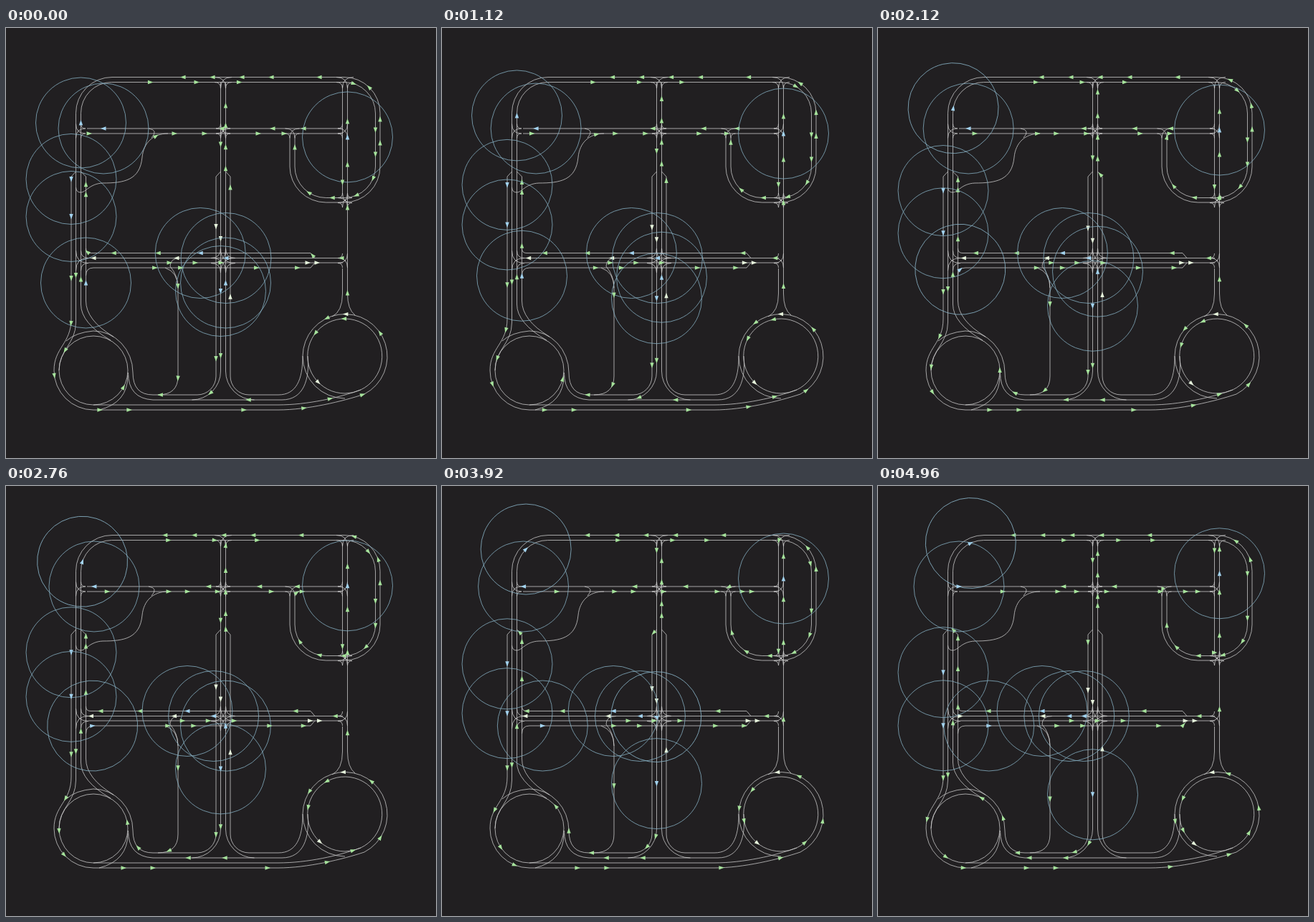
Animation, 600 px wide and 599 px high, one loop 5000 ms. Source, as an HTML page:

```html
<!DOCTYPE html>
<html>
<head>
<meta charset="utf-8">
<style>
  html, body { margin: 0; width: 100%; height: 100%; overflow: hidden; background: #211f21; }
  svg { display: block; width: 100%; height: 100%; }
  .lanes { fill: none; stroke: #d2d2d2; stroke-width: .75; }
  .ring { fill: none; stroke: #86afc2; stroke-width: .8; }
</style>
</head>
<body>
<svg viewBox="0 0 600 599"><path class="lanes"/></svg>
<script>
const NS = 'http://www.w3.org/2000/svg';
const svg = document.querySelector('svg');
const lanes = [], cars = [];
// Pixels travelled during one loop
const FAST = 76, FREE = 58, BUSY = 42, SLOW = 20, HELD = 8;

function add(tag, attrs) {
  const el = document.createElementNS(NS, tag);
  for (const name in attrs) el.setAttribute(name, attrs[name]);
  return svg.appendChild(el);
}

class Trip {
  constructor(d) {
    this.path = document.createElementNS(NS, 'path');
    this.path.setAttribute('d', d);
  }
  place(start, travel, fill, ring) {
    const body = add('path', { d: 'M4 0L-3.5 2.7V-2.7Z', fill });
    cars.push({ path: this.path, start, travel, parts: ring ? [body, ring] : [body] });
    return this;
  }
  send(speed, first, count = 1, gap = 0) {
    const fill = speed === HELD ? '#e6f3dc' : '#a6e39c';
    for (let i = 0; i < count; i++) this.place(first + i * gap, speed, fill);
    return this;
  }
  scan(start, travel) {
    return this.place(start, travel, '#a3d3ef', add('circle', { r: 63, class: 'ring' }));
  }
}

const trip = d => new Trip(d);
function road(d) {
  lanes.push(d);
  return trip(d);
}

// Turning curves of a junction, for the arms given by sign
function junction(x, y, reach, across = [-1, 1], along = [-1, 1]) {
  const lane = 3.5;
  for (const sx of [-1, 1]) for (const sy of along) {
    const from = `M${x + sx * lane} ${y + sy * reach}Q${x + sx * lane} `;
    if (across.includes(sx)) road(from + `${y + sy * lane} ${x + sx * reach} ${y + sy * lane}`);
    if (across.includes(-sx)) road(from + `${y - sy * lane} ${x - sx * reach} ${y - sy * lane}`);
  }
}

// Top road and the loop on the right
road('M522 193V118.5A50 50 0 0 0 472 68.5H148A50.5 50 0 0 0 97.5 118.5')
  .send(FREE, 33, 2, 33).send(FREE, 188).send(FREE, 255, 4, 41);
road('M104.5 200V118.5A43 43 0 0 1 147.5 75.5H472A43.5 43.5 0 0 1 515.5 119V193A43.5 43.5 0 0 1 472 236.5H446.5A43.5 43.5 0 0 1 403 193V153.5')
  .send(FREE, 203, 2, 124).send(FREE, 487).send(BUSY, 565, 6, 34).scan(68, 62);
road('M522 193A50 50 0 0 1 472 243H446.5A50.5 50 0 0 1 396 193V153.5');
trip('M507 83A50 50 0 0 0 480 69Q469.5 69 469.5 80V140').send(FREE, 0);
trip('M403 193V155Q403 147 411 147H470').send(BUSY, 27);

// Centre road
road('M299.5 200L293 207V485A26 26 0 0 1 267 511H205Q177 511 177 480A55 58 0 0 0 122 422Q97 424 84 436')
  .send(HELD, 79).send(FREE, 263).send(FAST, 380);
road('M299.5 75.5V478A40 40 0 0 1 259.5 518')
  .send(HELD, 218).send(BUSY, 381).scan(291, 63);
road('M346.5 518A40 40 0 0 1 306.5 478V75.5').send(BUSY, 345, 3, 30);
road('M414 457C414 490 405 511 380 511H339A26 26 0 0 1 313 485V207L306.5 200').send(HELD, 265);
trip('M240 75.5H290Q299.5 75.5 299.5 85V140').send(FREE, 26);
trip('M299.5 150V200L293 207V230').send(FREE, 12);
trip('M299.5 478A40 40 0 0 1 259.5 518H170').send(FAST, 35);
trip('M306.5 120V85Q306.5 75.5 316 75.5H400').send(FREE, 12);
trip('M313 230V207L306.5 200V130').send(FREE, 8);
trip('M306.5 400V335Q306.5 320.5 292 320.5H200').scan(45, 48);

// Wide cross road
road('M431 320.5L425 313.5H118Q111.5 313.5 111.5 307V207L104.5 200')
  .send(FREE, 5).send(FREE, 222).send(BUSY, 284).send(FREE, 321).send(SLOW, 402, 2, 14).scan(163, 42);
road('M470 320.5H115').send(SLOW, 2).send(HELD, 232, 2, 116).scan(163, 40);
road('M115 327H470').send(BUSY, 113, 3, 36).send(HELD, 306, 2, 13);
road('M150 430Q111.5 407 111.5 380V345Q111.5 334 122 334H425L431 327')
  .send(BUSY, 204, 2, 36).send(BUSY, 346).send(SLOW, 403).scan(91, 60);
road('M111.5 345V307');

// Left road, bottom road and roundabouts
road('M97.5 118.5V410C97.5 440 74 448 74 477A48 48 0 0 0 170 477').send(FREE, 226).send(FAST, 334);
road('M97.5 200L91 207V405C91 440 67 445 67 477A55 55 0 0 0 122 532H380C420 532 470 520 500 510A59 59 0 1 0 414 457A59 59 0 0 0 473 516')
  .send(FREE, 151, 2, 63).send(FAST, 292).send(FAST, 380, 2, 41).send(FAST, 581, 3, 84)
  .send(BUSY, 851).send(HELD, 908).send(FAST, 935).scan(13, 49).scan(65, 71);
road('M122 525H380C420 525 465 515 495 504A52 52 0 1 0 473 509A52 52 0 0 0 495 504')
  .send(FAST, 331).send(FREE, 517, 2, 46).send(HELD, 638);
road('M421 457C424 490 415 518 385 518H205Q170.5 516 170.5 480').send(FAST, 128);
road('M146 435Q104.5 411 104.5 385V200').send(SLOW, 103);
road('M170 477A48 48 0 0 0 74 477M130 532Q170 522 170 484');
trip('M122 525A48 48 0 0 0 122 429').send(FAST, 51);

// Branch running down to the bottom road
road('M243 320.5Q229 320.5 229 332Q240 345 240 362V485Q240 511 212 511').send(FAST, 51);
road('M222 334Q240 340 240 362');
trip('M240 470V485Q240 511 212 511H180').send(FREE, 18);

// Upper cross road and its side road
road('M113 147H470').send(FREE, 3).send(BUSY, 122, 2, 42).send(BUSY, 239).send(FREE, 275);
road('M470 140H113').send(BUSY, 98, 2, 71).scan(334, 30);
road('M97.5 222Q98 229 104 229C112 229 116 217 135 216C165 216 187 212 190 180C192 160 205 147 226 147');
road('M199 140Q213 142 203 153');
trip('M203 158Q207 147 226 147H300').send(BUSY, 10);
trip('M430 140H404Q396 140 396 148V160').send(SLOW, 15);

// Right road
road('M487 400Q476.5 392 476.5 370V80').send(FREE, 34).send(BUSY, 153, 3, 60).scan(251, 30);
road('M469.5 80V232').send(SLOW, 135);
road('M455 402Q469.5 395 469.5 370V335');

junction(303, 143.5, 10);
junction(473, 240, 10);
junction(303, 324, 17);
junction(101, 143.5, 10, [1]);
junction(101, 324, 14, [1]);
junction(473, 143.5, 10, [-1]);
junction(473, 324, 10, [-1]);
junction(303, 72, 12, [-1, 1], [1]);
junction(473, 72, 12, [-1, 1], [1]);
junction(399.5, 143.5, 10, [-1, 1], [1]);
svg.querySelector('.lanes').setAttribute('d', lanes.join(''));

// Steady traffic with three surges; seconds to share of the trip
const surge = (t, start, length) => Math.min(1, Math.max(0, (t - start) / length));
const progress = t => .145 * t + .035 * surge(t, 2, .2) + .16 * surge(t, 2.76, .56) + .09 * surge(t, 4.5, .4);

function draw() {
  const step = Math.floor(performance.now() % 5000 / 40);
  const share = progress(step * .04);
  for (const { path, start, travel, parts } of cars) {
    const s = start + travel * share;
    const a = path.getPointAtLength(s - 1), b = path.getPointAtLength(s + 1);
    const angle = Math.atan2(b.y - a.y, b.x - a.x) * 180 / Math.PI;
    const pose = `translate(${(a.x + b.x) / 2} ${(a.y + b.y) / 2}) rotate(${angle})`;
    for (const part of parts) part.setAttribute('transform', pose);
  }
  requestAnimationFrame(draw);
}
draw();
</script>
</body>
</html>
```
